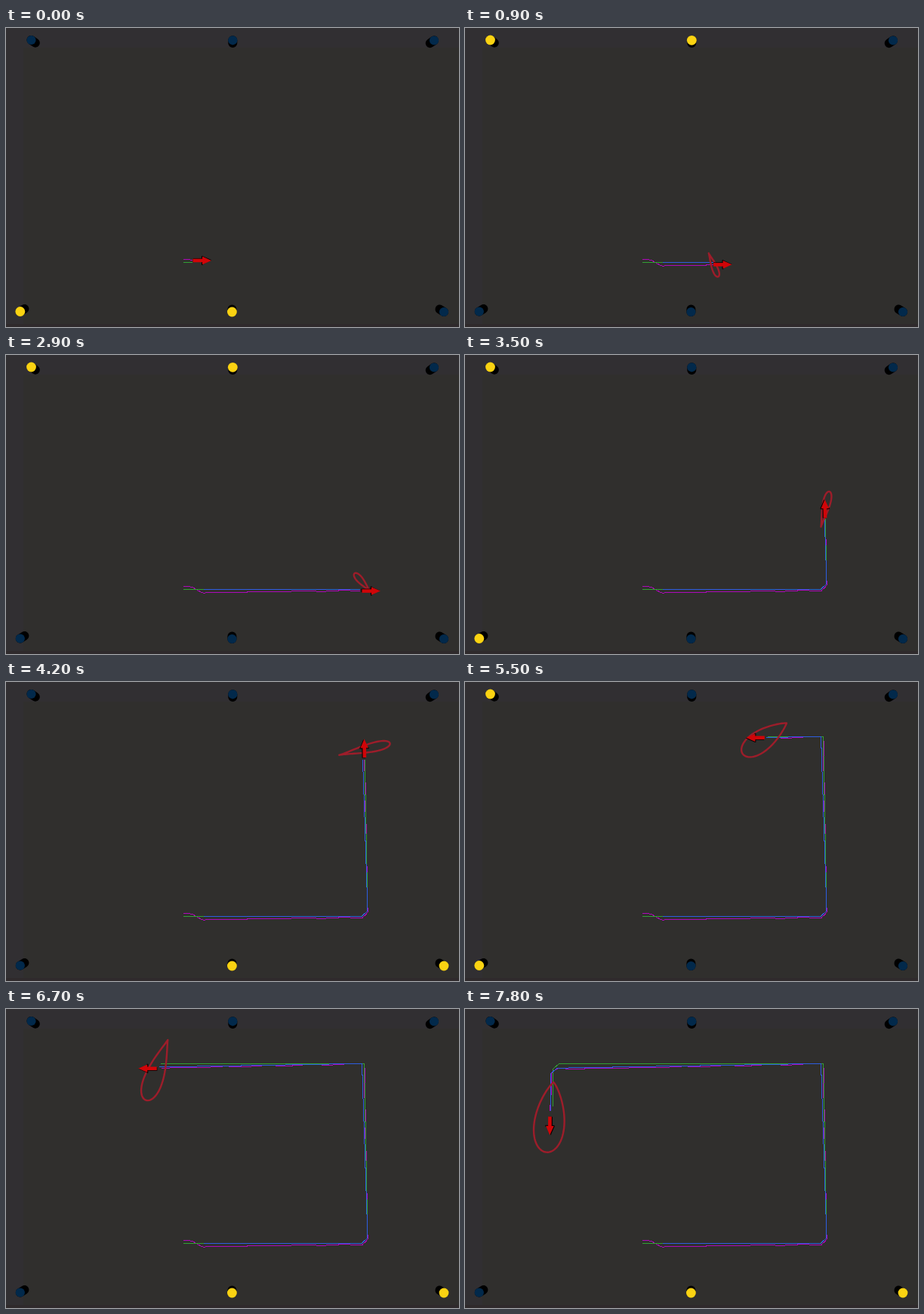
Write an HTML page with a canvas that moves like this. It is 600 px wide and 396 px high and loops after 8000 ms.

```html
<!DOCTYPE html>
<html lang="en">
<head>
<meta charset="utf-8">
<title>Robot localisation</title>
<style>
  html, body { margin: 0; width: 100%; height: 100%; overflow: hidden; background: #302f2d; }
  canvas { display: block; width: 600px; height: 396px; }
</style>
</head>
<body>
<canvas id="stage" width="600" height="396"></canvas>
<script>
const ctx = document.getElementById('stage').getContext('2d');
const LOOP = 8000, STEP = 100, SPEED = 0.165;

const posts = [[33.5, 16], [300.3, 16.3], [567, 16.5], [18.8, 375.5], [299.4, 376], [580, 376]];
// Pairs of detected posts, one pair per step
const detections = '34 01 45 34 12 03 01 45 45 01'.split(' ');
// Steps in which no update arrives
const stalled = new Set([1, 2, 3, 4, 17, 18, 24, 27, 37, 38, 40, 49, 50, 51, 53, 62, 63, 66, 70, 79]);

const route = [[235, 310.5], [471, 310.5], [479, 303], [474.5, 72.3], [125, 72.3], [117, 79], [115.5, 240]];
// The robot waits at each of these distances until the given time
const waits = [[12, 400], [236, 2900], [479, 5040], [840, 7467], [Infinity, LOOP]];

// Key shapes of the uncertainty loop: time, angle, length, half width, vertical shift
const spreadKeys = [
  [500, 68, 0, 0, 0],
  [1300, 68, 67, 7.5, 1],
  [2900, 229, 30, 4, -12],
  [4200, 347, 69, 6, -11],
  [5500, 505, 71, 14, 1],
  [6700, 470, 85, 12.5, 2],
  [7800, 456, 93, 20, 1]
];

const clamp = v => Math.min(1, Math.max(0, v));
const ease = v => { const k = clamp(v); return k * k * (3 - 2 * k); };

function routeAt(distance) {
  let left = Math.max(0, distance);
  for (let i = 1; ; i++) {
    const [ax, ay] = route[i - 1], [bx, by] = route[i];
    const len = Math.hypot(bx - ax, by - ay);
    if (left <= len || i === route.length - 1) {
      return [ax + (bx - ax) * left / len, ay + (by - ay) * left / len];
    }
    left -= len;
  }
}

// Dead reckoning drifts slowly away from the route
function odometryAt(s) {
  const [x, y] = routeAt(s);
  return [x - 3 * clamp((s - 248) / 230), y + 6 * clamp((s - 480) / 350)];
}

// The filter starts off the route, settles, then follows the drift
function estimateAt(s) {
  const [x, y] = routeAt(s);
  const settle = 5.3 * Math.exp(-s / 200) - 9 * (1 - ease((s - 8) / 20));
  const drift = 6.5 * clamp((s - 480) / 300);
  const ripple = 0.5 * Math.sin(s / 9);
  return [x + ripple - 3.5 * ease((s - 760) / 130), y + settle + drift + ripple];
}

function distanceAt(t) {
  let s = waits[0][0];
  for (let i = 0; i < waits.length - 1; i++) {
    const start = waits[i][1], stop = waits[i + 1][0];
    if (t > start) s = Math.min(stop, waits[i][0] + (t - start) * SPEED);
  }
  return s;
}

function spreadAt(t) {
  const next = spreadKeys.findIndex(key => key[0] > t);
  if (next < 0) return spreadKeys[spreadKeys.length - 1].slice(1);
  if (next === 0) return spreadKeys[0].slice(1);
  const a = spreadKeys[next - 1], b = spreadKeys[next];
  const k = (t - a[0]) / (b[0] - a[0]);
  return a.slice(1).map((v, i) => v + (b[i + 1] - v) * k);
}

function drawFloor() {
  ctx.fillStyle = '#312f32';
  ctx.fillRect(0, 0, 600, 396);
  ctx.fillStyle = '#302f2d';
  ctx.fillRect(23, 26, 577, 366);
  ctx.fillStyle = '#2f2a2c';
  ctx.fillRect(0, 392, 600, 4);
}

function drawPosts(lit) {
  posts.forEach(([x, y], i) => {
    const on = lit.includes(i);
    ctx.strokeStyle = '#000';
    ctx.lineWidth = 12;
    ctx.lineCap = 'round';
    ctx.beginPath();
    ctx.moveTo(x, y);
    ctx.lineTo(x + (300 - x) * 0.02, y + (198 - y) * 0.02);
    ctx.stroke();
    ctx.fillStyle = on ? '#fbd312' : '#02294b';
    ctx.beginPath();
    ctx.arc(x, y, on ? 6.4 : 6.1, 0, Math.PI * 2);
    ctx.fill();
  });
}

// Hard one-pixel line, without smoothing
function drawTrail(pointAt, from, to, color) {
  ctx.fillStyle = color;
  for (let s = from; s < to; s += 0.8) {
    const [x, y] = pointAt(s);
    ctx.fillRect(Math.floor(x), Math.floor(y), 1, 1);
  }
}

// Teardrop, the more pointed the narrower it is
function drawSpread(x, y, [angle, length, width, shift]) {
  if (!length) return;
  const point = Math.max(0.4, 2.6 - 9 * width / length);
  const peak = 2 * ((point + 1) / (point + 2)) ** ((point + 1) / 2) / Math.sqrt(point + 2);
  ctx.save();
  ctx.translate(x, y + shift);
  ctx.rotate(angle * Math.PI / 180);
  ctx.strokeStyle = '#9d1d2a';
  ctx.lineWidth = 2.4;
  ctx.lineJoin = 'round';
  ctx.beginPath();
  for (let i = 0; i < 72; i++) {
    const s = i / 72 * Math.PI * 2;
    ctx.lineTo(-Math.cos(s) * length / 2,
               width / peak * Math.sin(s) * Math.sin(s / 2) ** point);
  }
  ctx.closePath();
  ctx.stroke();
  ctx.restore();
}

function arrowShape(x, y, angle, color) {
  ctx.save();
  ctx.translate(x, y);
  ctx.rotate(angle);
  ctx.fillStyle = color;
  ctx.fillRect(0, -2.3, 13, 4.6);
  ctx.beginPath();
  ctx.moveTo(12.5, -5.3);
  ctx.lineTo(24.5, 0);
  ctx.lineTo(12.5, 5.3);
  ctx.fill();
  ctx.restore();
}

function drawArrow(x, y, angle) {
  arrowShape(x + (300 - x) * 0.006, y + (198 - y) * 0.006, angle, '#000');
  ctx.save();
  ctx.translate(x, y);
  ctx.rotate(angle);
  ctx.fillStyle = '#000';
  ctx.fillRect(11.5, -6, 1.8, 12);
  ctx.restore();
  arrowShape(x, y, angle, '#d00508');
}

function render(now) {
  let step = Math.floor(now % LOOP / STEP);
  while (stalled.has(step)) step--;
  const time = step * STEP;
  const s = distanceAt(time);
  const [x, y] = estimateAt(s);
  const [aheadX, aheadY] = routeAt(s), [behindX, behindY] = routeAt(s - 12);
  const shown = s * 0.992;

  drawFloor();
  drawTrail(estimateAt, 0, shown, '#ae08ba');
  drawTrail(routeAt, 0, shown, '#31a033');
  drawTrail(odometryAt, 27, shown, '#2d5ee0');
  drawPosts([...detections[step % detections.length]].map(Number));
  drawSpread(x, y, spreadAt(time));
  drawArrow(x, y, Math.atan2(aheadY - behindY, aheadX - behindX));
}

const origin = performance.now();
function tick() {
  render(performance.now() - origin);
  requestAnimationFrame(tick);
}
tick();
</script>
</body>
</html>
```
